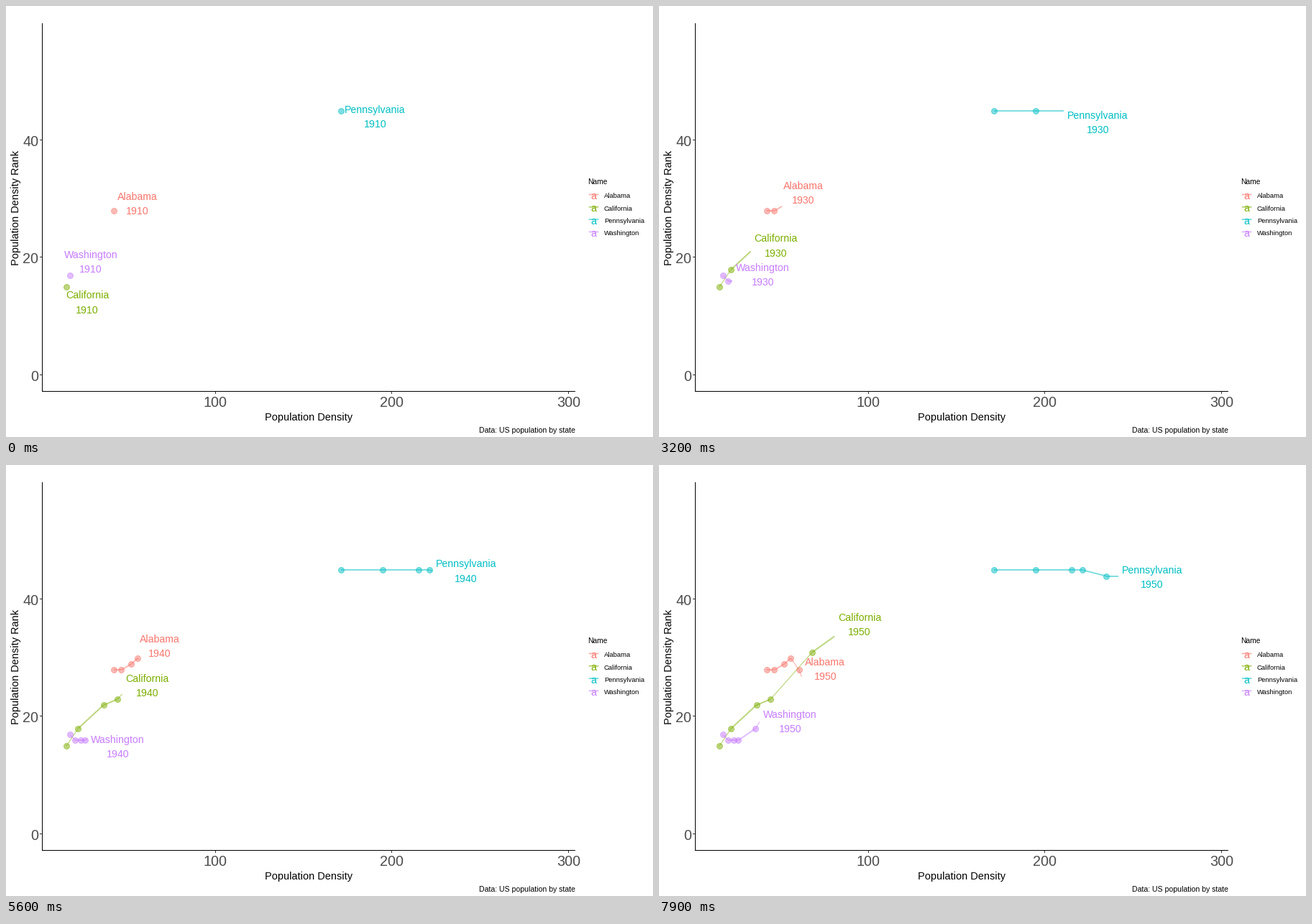
A matplotlib script that plays this animation: 900x600 px, repeating every 8000 ms.

```python
import math
import random

import matplotlib.pyplot as plt
from matplotlib.animation import FuncAnimation
from matplotlib.collections import LineCollection

W, H, DPI = 900, 600, 100
PX = 72 / DPI
FRAMES, STEP = 80, 18  # animation frames, frames per decade
LEFT_EDGE = 53
TOP, BOTTOM = -19, 21  # how far a label may move off its point

plt.rcParams["font.family"] = ["Liberation Sans", "DejaVu Sans"]


class State:
    """One trail; points are (density, rank) per decade."""

    def __init__(self, name, color, half, rise, under, points):
        self.name, self.color, self.half = name, color, half
        self.rise, self.under = rise, under  # usual label dy, dx when below
        self.points = [(px(d), py(r)) for d, r in points]

    def trail(self, k):
        """Reached points plus the moving head."""
        i, part = k // STEP, k % STEP / STEP
        (x0, y0), (x1, y1) = self.points[i:i + 2]
        head = x0 + (x1 - x0) * part, y0 + (y1 - y0) * part
        return self.points[:i + 1], head


def px(density):
    return 46.2 + 2.4535 * density


def py(rank):
    return 514 - 8.17 * rank


STATES = [
    State("Alabama", "#F8766D", 28, -16, 29,
          [(42.2, 28), (46.5, 28), (52.2, 29), (55.9, 30), (60.5, 28), (64.5, 25)]),
    State("California", "#7CAE00", 30, -13, 29,
          [(15.3, 15), (22, 18), (36.4, 22), (44.4, 23), (68, 31), (100.6, 38)]),
    State("Pennsylvania", "#00BFC4", 42, 0, 38,
          [(171.3, 45), (194.9, 45), (215.3, 45), (221.4, 45), (234.6, 44), (252.5, 44)]),
    State("Washington", "#C77CFF", 37.5, 2, -38,
          [(17.3, 17), (20.5, 16), (23.6, 16), (26.1, 16), (35.9, 18), (42, 21)]),
]


def crowded(state, heads):
    """Place of a label whose head has a close neighbour."""
    x, y = heads[state]
    for other, (ox, oy) in heads.items():
        if other is not state and math.hypot(x - ox, y - oy) < 38:
            if y < oy:
                return x + 29, y + TOP
            return max(x + state.under, LEFT_EDGE + state.half), y + BOTTOM
    return None


def loose(state, head, rng):
    """Beside the head, or slipped above / below it."""
    dy = max(TOP, min(BOTTOM, rng.gauss(state.rise, 9)))
    dx = state.half + 4.5 if abs(dy) < 17 else 29
    return max(head[0] + dx, LEFT_EDGE + state.half), head[1] + dy


def is_clear(state, pos, spots, heads):
    x, y = pos
    return (all(abs(x - sx) >= state.half + s.half or abs(y - sy) >= 37
                for s, (sx, sy) in spots.items())
            and all(abs(x - hx) >= state.half + 3 or abs(y - hy) >= 18
                    for s, (hx, hy) in heads.items() if s is not state))


def label_spots(k):
    rng = random.Random(100 + k)
    heads = {s: s.trail(k)[1] for s in STATES}
    spots = {s: crowded(s, heads) for s in STATES}
    spots = {s: pos for s, pos in spots.items() if pos}
    for s in STATES:
        if s not in spots:
            for _ in range(60):
                pos = loose(s, heads[s], rng)
                if is_clear(s, pos, spots, heads):
                    break
            spots[s] = pos
    return spots


fig = plt.figure(figsize=(W / DPI, H / DPI), dpi=DPI, facecolor="white")
ax = fig.add_axes([0, 0, 1, 1])
ax.set(xlim=(0, W), ylim=(H, 0))
ax.axis("off")


def text(x, y, s, size, color="black", ha="center", **kw):
    """Text whose capitals are centred on y."""
    return ax.text(x, y + 0.36 * size, s, size=size * PX, color=color,
                   ha=ha, va="baseline", **kw)


def line(xs, ys, color="black", width=1, **kw):
    ax.plot(xs, ys, color=color, lw=width * PX, solid_capstyle="butt",
            snap=False, **kw)


# axes
line((50.5, 50.5), (24, 537))
line((50, 792), (536.5, 536.5))
for value in (100, 200, 300):
    x = math.floor(px(value)) + 0.5
    line((x, x), (537, 540), "#333333")
    text(x, 551, str(value), 19.8, "#4D4D4D")
for value in (0, 20, 40):
    y = math.floor(py(value)) - 0.5
    line((47, 50), (y, y), "#333333")
    text(45.5, y + 1.5, str(value), 19.8, "#4D4D4D", "right")
text(420.5, 572, "Population Density", 14.5)
ax.text(17.8, 281, "Population Density Rank", size=14.5 * PX, rotation=90,
        ha="center", va="baseline", rotation_mode="anchor")
text(792, 590, "Data: US population by state", 10.55, ha="right")

# legend
text(809, 244.5, "Name", 10.2, ha="left")
for i, s in enumerate(STATES):
    y = 264 + 17.3 * i
    line((810.7, 824.5), (y - 1.5, y - 1.5), s.color, 2, alpha=0.5)
    text(817.5, y, "a", 14.2, s.color)
    text(832, y, s.name, 9.4, ha="left")

# moving parts
parts = {}
for s in STATES:
    path = LineCollection([], colors=s.color, alpha=0.5, zorder=2)
    ax.add_collection(path, autolim=False)
    dots = ax.scatter([], [], s=(8 * PX) ** 2, color=s.color, alpha=0.5,
                      linewidths=PX, zorder=3)
    title = text(0, 0, s.name, 14.1, s.color, zorder=4)
    year = text(0, 0, "", 14.1, s.color, zorder=4)
    parts[s] = path, dots, title, year


def stroke(a, b):
    """Steep pieces are drawn thinner."""
    return (1.2 if abs(b[1] - a[1]) > abs(b[0] - a[0]) else 2) * PX


def update(k):
    decade = 1910 + 10 * ((k + STEP // 2) // STEP)
    spots = label_spots(k)
    for s, (path, dots, title, year) in parts.items():
        pts, head = s.trail(k)
        pieces = list(zip(pts, pts[1:] + [head]))
        path.set_segments(pieces)
        path.set_linewidths([stroke(a, b) for a, b in pieces])
        dots.set_offsets(pts)
        x, y = spots[s]
        title.set_position((x + 0.3, y - 5))
        year.set_position((x + 0.3, y + 15.2))
        year.set_text(str(decade))
    return [artist for group in parts.values() for artist in group]


anim = FuncAnimation(fig, update, frames=FRAMES, interval=100,
                     repeat=True, repeat_delay=0)
plt.show()
```
